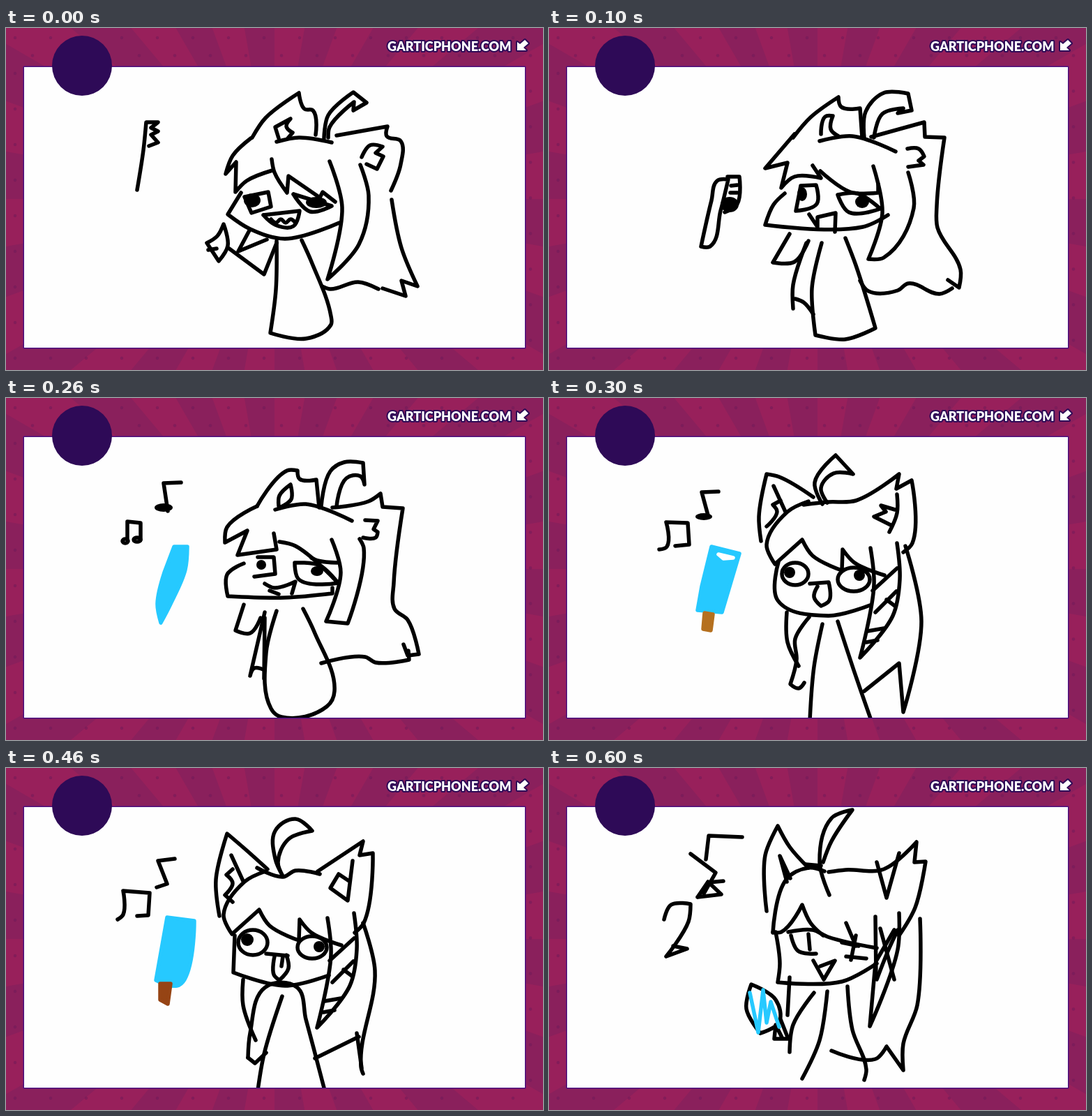
Write an HTML page with a canvas that moves like this. It is 770 by 490 pixels and loops after 0.7 s.

```html
<!DOCTYPE html>
<html lang="en">
<head>
<meta charset="utf-8">
<title>Doodle loop</title>
<style>
html, body { margin: 0; width: 100%; height: 100%; overflow: hidden; }
canvas { display: block; }
</style>
</head>
<body>
<canvas width="770" height="490"></canvas>
<script>
const ctx = document.querySelector('canvas').getContext('2d');
const BLUE = '#26c9ff', BROWN = '#964414', DEEP = '#2e0a57';

// Smooth path through points; sharp turns stay corners.
function trace(nums) {
  const pts = [];
  for (let i = 0; i < nums.length; i += 2) pts.push({ x: nums[i], y: nums[i + 1] });
  const unit = (a, b) => {
    const len = Math.hypot(b.x - a.x, b.y - a.y) || 1;
    return { x: (b.x - a.x) / len, y: (b.y - a.y) / len, len };
  };
  const tangents = pts.map((p, i) => {
    if (!i || i === pts.length - 1) return { x: 0, y: 0 };
    const a = unit(pts[i - 1], p), b = unit(p, pts[i + 1]);
    if (a.x * b.x + a.y * b.y < 0.25) return { x: 0, y: 0 };
    return unit({ x: 0, y: 0 }, { x: a.x + b.x, y: a.y + b.y });
  });
  const path = new Path2D();
  path.moveTo(pts[0].x, pts[0].y);
  for (let i = 1; i < pts.length; i++) {
    const a = pts[i - 1], b = pts[i], s = tangents[i - 1], e = tangents[i];
    const reach = unit(a, b).len / 3;
    path.bezierCurveTo(a.x + s.x * reach, a.y + s.y * reach,
      b.x - e.x * reach, b.y - e.y * reach, b.x, b.y);
  }
  return path;
}

function ink(...nums) {
  ctx.stroke(trace(nums));
}

function paint(color, ...nums) {
  ctx.fillStyle = ctx.strokeStyle = color;
  const path = trace(nums);
  path.closePath();
  ctx.fill(path);
  ctx.stroke(path);
  ctx.fillStyle = ctx.strokeStyle = '#000';
}

function oval(x, y, rx, ry, solid) {
  ctx.beginPath();
  ctx.ellipse(x, y, rx, ry, 0, 0, 7);
  solid ? ctx.fill() : ctx.stroke();
}

const blob = (x, y, rx, ry = rx) => oval(x, y, rx, ry, true);

function zigzag(x, y, step, height, count) {
  const nums = [];
  for (let i = 0; i < count; i++) nums.push(x + i * step, y + i % 2 * height);
  ink(...nums);
}

// Parts shared by the drawings with pointed ears
function fringe() {
  ink(372, 148, 342, 163, 312, 210, 324, 238, 363, 203, 378, 226, 420, 247, 421, 217, 438, 236, 481, 254);
}

function lock() {
  ink(461, 215, 466, 268, 446, 372, 493, 312, 503, 260, 499, 208);
  ink(464, 276, 499, 244);
  ink(468, 307, 498, 277);
  ink(484, 289, 496, 298);
  ink(457, 334, 480, 330);
  ink(455, 350, 471, 347);
}

const poses = [
  function thumbUp() {
    ink(188, 232, 197, 175, 201, 135, 218, 135, 208, 143, 218, 148, 208, 153, 218, 164, 205, 169);
    ink(353, 157, 372, 129, 420, 93, 428, 116, 440, 118, 444, 153);
    ink(391, 158, 386, 142, 408, 130, 402, 141, 411, 150, 404, 158);
    ink(456, 158, 462, 125, 498, 92, 517, 107, 498, 118, 499, 106, 464, 142, 462, 157);
    ink(388, 163, 420, 157, 467, 164);
    ink(474, 154, 547, 141, 546, 155, 566, 162, 566, 195, 552, 233);
    ink(510, 185, 522, 168, 540, 170, 530, 179, 541, 184, 532, 202, 517, 195);
    ink(351, 158, 325, 183, 315, 209, 330, 192, 329, 235, 345, 219, 382, 204);
    ink(381, 188, 385, 207, 403, 236, 405, 212, 450, 243, 454, 235, 472, 249);
    ink(464, 191, 482, 257, 461, 360, 506, 310, 520, 240, 508, 196);
    ink(553, 246, 567, 315, 590, 370, 567, 362, 573, 384, 540, 373);
    ink(453, 370, 465, 374, 505, 364, 534, 374);
    ink(337, 236, 318, 267, 350, 288, 400, 302, 478, 279);
    ink(342, 242, 376, 235, 380, 256, 352, 265, 342, 242);
    ink(412, 238, 436, 263, 467, 255, 412, 238);
    ink(369, 268, 421, 262, 412, 284, 386, 282, 369, 268);
    zigzag(380, 274, 7, 5, 6);
    blob(353, 247, 12, 10);
    blob(445, 250, 15, 8);
    ink(388, 305, 387, 375, 379, 437, 430, 445, 466, 425, 466, 413, 438, 335, 424, 304);
    ink(388, 308, 370, 353, 320, 316);
    ink(349, 290, 333, 320, 374, 303);
    ink(288, 308, 303, 298, 312, 281, 318, 312, 305, 334, 288, 308);
    ink(290, 318, 302, 316);
  },

  function brush() {
    ink(218, 313, 233, 247, 241, 219, 257, 217, 246, 262, 231, 313, 218, 313);
    ink(256, 213, 273, 213, 270, 252, 252, 264);
    ink(261, 226, 270, 225);
    ink(260, 236, 270, 236);
    blob(259, 253, 13, 11);
    ink(350, 157, 375, 128, 415, 99, 419, 113, 446, 115, 449, 157);
    ink(390, 152, 396, 127, 407, 126, 404, 145, 415, 155);
    ink(452, 157, 454, 120, 480, 93, 515, 94, 520, 118, 500, 122, 508, 115, 478, 123, 466, 157);
    ink(388, 162, 435, 155, 497, 177);
    ink(462, 156, 538, 135, 539, 156, 567, 157, 556, 255, 557, 286, 590, 346, 588, 372, 572, 361);
    ink(578, 373, 560, 381, 515, 366, 500, 376, 458, 377, 446, 362);
    ink(514, 173, 530, 173, 538, 184, 530, 190, 537, 196, 515, 199);
    ink(352, 152, 310, 201, 342, 193, 333, 229, 352, 213, 390, 215, 378, 197);
    ink(389, 205, 432, 235, 472, 236, 472, 224);
    ink(465, 198, 478, 265, 458, 331, 480, 329, 523, 258, 515, 207);
    ink(338, 237, 322, 253, 310, 282, 450, 285, 486, 268);
    ink(361, 226, 383, 225, 384, 252, 354, 262, 361, 226);
    ink(414, 239, 442, 237, 475, 259, 430, 264, 414, 239);
    ink(373, 267, 385, 285, 385, 271, 411, 265, 410, 292);
    blob(363, 238, 7, 10);
    blob(449, 249, 10, 9);
    ink(391, 308, 377, 373, 382, 440, 425, 446, 468, 430, 440, 340, 425, 301);
    ink(345, 295, 321, 336, 352, 335, 372, 305);
    ink(369, 308, 350, 368, 350, 402);
    ink(353, 388, 365, 393, 379, 410);
  },

  function humming() {
    ink(251, 121, 226, 122, 232, 162);
    blob(226, 157, 13, 6);
    ink(174, 202, 174, 177, 193, 179, 193, 203);
    oval(171, 205, 4, 3);
    oval(188, 203, 5, 3);
    paint(BLUE, 241, 213, 260, 213, 257, 246, 236, 295, 222, 322, 217, 295, 227, 250);
    ink(360, 155, 403, 104, 418, 104, 421, 116, 445, 117, 449, 157);
    ink(391, 155, 392, 140, 408, 124, 409, 145, 392, 157);
    ink(452, 155, 465, 105, 485, 92, 512, 93, 514, 124, 508, 112, 488, 115, 474, 155);
    ink(386, 160, 430, 152, 496, 176);
    ink(468, 157, 520, 148, 537, 137, 540, 156, 569, 158, 556, 265, 557, 302, 576, 318, 592, 367, 576, 369, 570, 353);
    ink(577, 362, 578, 375, 530, 379, 515, 371, 452, 380);
    ink(515, 175, 533, 176, 527, 188, 533, 192, 530, 200, 512, 200);
    ink(360, 155, 317, 185, 314, 207, 346, 190, 332, 225, 388, 217, 384, 194);
    ink(392, 206, 415, 212, 475, 264);
    ink(438, 229, 447, 233, 475, 236);
    ink(467, 203, 480, 250, 459, 320, 490, 323, 513, 215, 507, 202);
    ink(341, 237, 317, 253, 318, 284, 400, 286, 468, 280, 468, 272);
    ink(361, 228, 384, 228, 386, 252, 356, 256);
    ink(414, 236, 450, 240, 476, 265, 420, 260, 414, 236);
    ink(371, 266, 385, 272, 415, 263, 410, 280);
    ink(378, 276, 391, 281);
    blob(366, 239, 7);
    blob(446, 248, 9, 7);
    ink(388, 305, 373, 365, 380, 445, 395, 457, 460, 442, 471, 420, 442, 335, 426, 302);
    ink(341, 296, 329, 333, 350, 337, 365, 315);
    ink(371, 307, 350, 398, 356, 387, 371, 390);
    ink(371, 315, 370, 402);
  },

  function popsicle() {
    ink(243, 134, 219, 135, 228, 168);
    blob(222, 170, 12, 5);
    ink(158, 217, 169, 213, 168, 178, 199, 179, 201, 210, 181, 212);
    paint(BLUE, 233, 213, 273, 223, 248, 307, 213, 304, 219, 270);
    paint('#fff', 243, 224, 264, 229, 250, 230);
    paint('#b5701f', 223, 308, 235, 310, 232, 333, 221, 331);
    ink(304, 205, 301, 170, 312, 109, 330, 113, 379, 142);
    ink(322, 126, 339, 163);
    ink(332, 147, 321, 153, 327, 163, 312, 184);
    ink(392, 152, 381, 121, 411, 82, 436, 109, 408, 108, 390, 129, 399, 150);
    ink(365, 153, 400, 149, 440, 147, 502, 109, 498, 130, 520, 118, 521, 208, 508, 221);
    ink(488, 192, 499, 165, 499, 138);
    ink(496, 160, 476, 154, 483, 163, 466, 170, 490, 182);
    fringe();
    lock();
    ink(511, 212, 534, 320, 508, 450, 502, 380, 452, 420);
    ink(329, 235, 328, 290, 400, 312, 460, 297);
    ink(374, 266, 401, 264, 402, 290, 390, 298, 380, 285, 385, 270);
    oval(353, 252, 19, 16);
    oval(437, 260, 23, 17);
    blob(345, 250, 8);
    blob(445, 254, 8);
    ink(392, 324, 380, 385, 374, 462);
    ink(414, 320, 437, 390, 462, 462);
    ink(341, 307, 342, 350, 358, 384);
    ink(373, 314, 353, 345, 355, 375, 346, 410, 358, 416, 366, 408);
  },

  function tongueOut() {
    ink(242, 130, 218, 133, 231, 166, 216, 171);
    ink(160, 217, 168, 210, 168, 176, 206, 179, 204, 211, 188, 212);
    paint(BLUE, 231, 214, 270, 219, 256, 303, 245, 312, 215, 304);
    paint(BROWN, 221, 309, 236, 309, 232, 338, 221, 332);
    ink(306, 212, 301, 160, 317, 94, 345, 118, 375, 145);
    ink(323, 125, 340, 162);
    ink(325, 145, 316, 153, 325, 165, 314, 182, 325, 192);
    ink(397, 155, 386, 130, 386, 90, 415, 73, 439, 90, 405, 102, 390, 135, 397, 155);
    ink(360, 143, 397, 156, 415, 147, 450, 152);
    ink(447, 148, 512, 105, 507, 125, 526, 122, 513, 222, 500, 236);
    ink(497, 133, 490, 190, 465, 172, 477, 152, 492, 162);
    fringe();
    lock();
    ink(512, 222, 529, 290, 509, 428, 512, 438);
    ink(510, 430, 503, 380);
    ink(506, 385, 443, 416);
    ink(328, 240, 326, 293, 400, 312, 463, 297);
    ink(373, 266, 404, 269);
    ink(385, 270, 384, 296, 392, 304, 405, 287, 402, 268);
    ink(397, 270, 395, 284);
    oval(354, 250, 21, 18);
    oval(439, 257, 21, 16);
    blob(346, 246, 9);
    blob(449, 256, 8);
    ink(396, 327, 370, 410, 361, 462);
    ink(340, 303, 340, 340, 358, 390);
    ink(347, 415, 350, 380, 372, 314, 417, 314, 430, 360, 457, 462);
    ink(347, 415, 357, 423, 373, 408);
  },

  function serving() {
    ink(279, 102, 276, 91, 209, 100, 228, 98, 210, 113, 232, 120, 232, 165);
    ink(216, 168, 229, 172);
    ink(124, 236, 134, 236, 127, 247, 146, 244, 165, 202, 206, 202, 207, 215, 183, 230, 206, 228, 180, 260);
    ink(132, 238, 132, 270);
    blob(225, 158, 11);
    blob(127, 271, 9);
    blob(176, 262, 13, 8);
    paint(BLUE, 297, 312, 336, 361, 332, 373, 309, 382, 278, 345, 280, 326);
    paint(BROWN, 331, 374, 346, 385, 336, 390, 326, 379);
    ink(314, 210, 299, 170, 300, 128, 332, 96, 347, 125, 375, 145);
    ink(326, 170, 320, 150, 328, 126, 345, 155);
    ink(400, 181, 390, 170, 389, 108, 430, 70, 445, 83, 405, 98, 389, 125);
    ink(313, 231, 328, 165, 372, 142, 450, 143, 517, 110, 528, 126, 526, 190, 515, 223);
    ink(488, 137, 497, 150, 499, 184, 469, 172, 475, 153, 490, 160);
    ink(313, 231, 333, 231, 362, 202, 390, 240, 435, 252);
    ink(425, 222, 432, 248, 452, 248);
    ink(460, 217, 463, 290, 450, 368, 465, 365, 494, 285, 498, 210);
    ink(465, 235, 485, 260, 498, 245);
    ink(480, 232, 498, 240);
    ink(470, 312, 493, 290);
    ink(460, 335, 478, 337);
    ink(455, 350, 478, 350);
    ink(515, 217, 533, 275, 515, 365, 506, 428, 500, 385, 480, 410, 422, 415, 403, 400);
    ink(328, 232, 325, 292, 380, 312, 470, 290);
    oval(360, 252, 22, 16);
    ink(415, 258, 430, 275, 450, 274, 462, 260);
    ink(384, 275, 407, 270, 405, 295, 394, 309, 384, 295, 384, 275);
    blob(370, 256, 9);
    blob(432, 263, 9);
    ink(394, 333, 390, 360, 358, 450);
    ink(342, 298, 342, 345, 350, 374);
    ink(373, 392, 370, 411, 345, 415, 358, 355, 372, 318, 420, 310, 435, 360, 452, 462);
  },

  function tasting() {
    ink(277, 99, 229, 97, 225, 131);
    ink(203, 123, 239, 150, 222, 180);
    ink(213, 185, 228, 163, 247, 181, 213, 185);
    ink(228, 164, 250, 162);
    ink(165, 217, 175, 196, 203, 195, 200, 220, 168, 270, 198, 259, 178, 255);
    ink(303, 380, 283, 345, 290, 310, 325, 332, 330, 364, 303, 380);
    ink(332, 360, 343, 388, 323, 388, 325, 368, 335, 388);
    ctx.strokeStyle = BLUE;
    ink(288, 322, 300, 379, 307, 318, 312, 365, 318, 335, 330, 371);
    ctx.strokeStyle = '#000';
    ink(312, 205, 310, 125, 328, 83, 345, 113, 372, 143);
    ink(341, 163, 331, 126, 346, 158);
    ink(402, 182, 388, 135, 405, 72, 435, 60, 405, 105, 393, 135);
    ink(321, 236, 340, 160, 372, 143, 395, 148);
    ink(368, 138, 390, 140);
    ink(401, 149, 425, 146, 480, 145, 527, 106, 524, 135, 540, 134, 525, 200, 502, 240);
    ink(470, 135, 484, 186, 502, 122);
    ink(321, 235, 333, 235, 363, 196, 375, 222, 393, 240);
    ink(468, 213, 469, 300);
    ink(468, 280, 460, 370, 500, 260, 502, 208);
    ink(470, 303, 487, 260, 500, 232);
    ink(475, 230, 495, 303);
    ink(495, 232, 470, 275);
    ink(532, 216, 528, 340, 508, 395, 508, 433, 484, 399, 468, 417, 405, 405);
    ink(325, 235, 331, 280, 328, 307, 420, 306, 470, 280);
    ink(343, 235, 378, 232, 400, 242, 470, 258);
    ink(347, 240, 357, 262, 383, 266);
    ink(372, 238, 374, 260);
    ink(426, 222, 440, 255);
    ink(440, 240, 433, 275);
    ink(420, 250, 444, 255);
    ink(426, 270, 455, 273);
    ink(379, 276, 394, 303, 410, 276, 389, 284);
    ink(399, 320, 388, 390, 363, 445);
    ink(428, 313, 435, 375, 455, 432, 452, 447);
    ink(345, 300, 342, 354);
    ink(380, 322, 350, 368, 345, 407);
  }
];

function backdrop() {
  ctx.fillStyle = '#98205b';
  ctx.fillRect(0, 0, 770, 490);
  ctx.fillStyle = '#8a205c';
  const wedge = Math.PI / 18;
  for (let i = 0; i < 36; i += 2) {
    ctx.beginPath();
    ctx.moveTo(385, 245);
    ctx.arc(385, 245, 500, i * wedge, (i + 1) * wedge);
    ctx.fill();
  }
  ctx.fillStyle = '#6d1a5a80';
  for (let row = 0; row < 20; row++)
    for (let x = row % 2 ? 38 : 13; x < 770; x += 51) blob(x, 14 + row * 25.5, 2.2);
}

function outlined(shape) {
  ctx.strokeStyle = DEEP;
  ctx.fillStyle = '#fff';
  ctx.lineWidth = 4;
  shape('stroke');
  shape('fill');
}

function header() {
  ctx.fillStyle = DEEP;
  blob(109, 54, 43);
  ctx.font = '900 18px Lato, sans-serif';
  ctx.textAlign = 'right';
  outlined(mode => ctx[mode + 'Text']('GARTICPHONE.COM', 724.5, 33));
  const arrow = new Path2D('M733 32V20L737 23 744 17 749 22 742 28 746 32Z');
  outlined(mode => ctx[mode](arrow));
}

function draw(time) {
  backdrop();
  ctx.lineCap = ctx.lineJoin = 'round';
  ctx.strokeStyle = '#4b1080';
  ctx.lineWidth = 3;
  ctx.strokeRect(26, 56, 718, 402);
  ctx.fillStyle = '#fefefe';
  ctx.fillRect(26, 56, 718, 402);

  ctx.save();
  ctx.beginPath();
  ctx.rect(26, 56, 718, 402);
  ctx.clip();
  ctx.fillStyle = ctx.strokeStyle = '#000';
  ctx.lineWidth = 5.5;
  poses[Math.floor(time / 100) % poses.length]();
  ctx.restore();

  header();
}

const start = performance.now();
function tick() {
  draw(performance.now() - start);
  requestAnimationFrame(tick);
}
tick();
</script>
</body>
</html>
```
